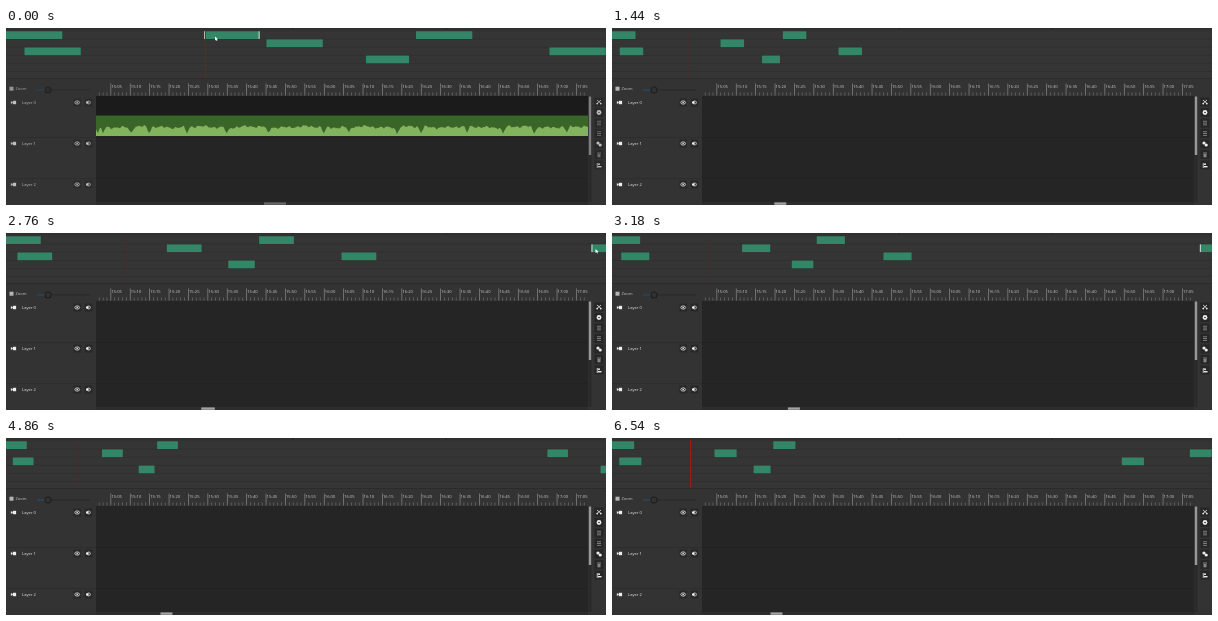
Write an HTML page with a canvas that moves like this. It is 600 px wide and 177 px high and loops after 7.2 s.

```html
<!DOCTYPE html>
<html lang="en">
<head>
<meta charset="utf-8">
<title>Timeline overview</title>
<style>
  html, body { margin: 0; width: 100%; height: 100%; overflow: hidden; background: #333; }
  canvas { display: block; width: 600px; height: 177px; }
</style>
</head>
<body>
<canvas id="stage"></canvas>
<script>
const canvas = document.getElementById('stage');
const ctx = canvas.getContext('2d');
const ratio = window.devicePixelRatio || 1;
canvas.width = 600 * ratio;
canvas.height = 177 * ratio;

const LOOP = 7200, STEP = 60, CLIP = 56.3;
const MAIN = { left: 90, top: 68, right: 582, bottom: 174 };
const ROW = 8.1;

// Clip starts on the overview, as [time, units]; one unit is one pixel at full scale.
const firstDrag = [[0, 198], [180, 232], [420, 365], [660, 490], [780, 518], [840, 518], [960, 590],
  [1680, 1950], [1860, 1950], [1980, 1400], [2100, 1052], [2160, 992], [2400, 850], [2580, 850],
  [3120, 1145], [3180, 1177], [3360, 1469]];
const secondDrag = [[4260, 543.5], [4380, 750], [4560, 1270], [4680, 1465], [4740, 1530],
  [5400, 1987], [5460, 2014], [5580, 2350], [5700, 1900], [5820, 1480], [5940, 1296]];
const fixedClips = [[0, CLIP, 0], [18.5, CLIP, 2], [260.5, CLIP, 1], [360, 43, 3], [410, CLIP, 0]];

const within = (t, a, b) => t >= a && t < b;
const mix = (a, b, k) => a + (b - a) * k;

function track(keys, t) {
  if (t <= keys[0][0]) return keys[0][1];
  for (let i = 1; i < keys.length; i++) {
    const [t0, v0] = keys[i - 1], [t1, v1] = keys[i];
    if (t <= t1) return mix(v0, v1, (t - t0) / (t1 - t0));
  }
  return keys[keys.length - 1][1];
}

function fitScale(t) {
  const end = Math.max(track(firstDrag, t), track(secondDrag, t)) + CLIP;
  return Math.min(1, 600 / end);
}

function box(x, y, w, h, color) {
  ctx.fillStyle = color;
  ctx.fillRect(x, y, w, h);
}

function dot(x, y, r, color) {
  ctx.fillStyle = color;
  ctx.beginPath();
  ctx.arc(x, y, r, 0, Math.PI * 2);
  ctx.fill();
}

function shape(points, color) {
  ctx.fillStyle = color;
  ctx.beginPath();
  points.forEach(([x, y]) => ctx.lineTo(x, y));
  ctx.fill();
}

function stroke(points, color, width = 0.8) {
  ctx.strokeStyle = color;
  ctx.lineWidth = width;
  ctx.beginPath();
  points.forEach(([x, y], i) => i ? ctx.lineTo(x, y) : ctx.moveTo(x, y));
  ctx.stroke();
}

// Small type is laid out large and scaled down to keep its true widths.
function label(text, x, y, size, color) {
  ctx.save();
  ctx.translate(x, y);
  ctx.scale(0.1, 0.1);
  ctx.font = `${size * 10}px "Noto Sans", sans-serif`;
  ctx.fillStyle = color;
  ctx.fillText(text, 0, 0);
  ctx.restore();
}

function overviewClip(x, w, row, selected) {
  const y = 3.3 + row * ROW;
  box(x, y, w, 7.7, '#338666');
  if (selected) {
    box(x, y, 1, 7.7, '#d0ddd6');
    box(x + w - 1, y, 1, 7.7, '#d0ddd6');
  }
}

function cursor(x, y) {
  if (x > 590) return;
  shape([[x, y], [x, y + 4], [x + 1, y + 3.2], [x + 1.7, y + 4.6],
    [x + 2.4, y + 4.2], [x + 1.8, y + 2.9], [x + 3, y + 2.8]], '#fff');
}

function playheadColor(t) {
  if (t < STEP) return '#6e2525';
  return within(t, 1740, 2700) || t >= 5700 ? '#a8171b' : '#482c2c';
}

function overview(t) {
  const scale = fitScale(Math.max(0, t - STEP));
  const first = { x: track(firstDrag, t) * scale, row: t < 1200 ? 0 : 1 };
  const second = { x: track(secondDrag, t) * scale, row: within(t, 4560, 5760) ? 3 : 2 };

  box(0, 0, 600, 50, '#353535');
  box(0, 0, 600, 2, '#303030');
  for (let i = 0; i < 6; i++) box(0, 2.6 + i * ROW, 600, 0.6, '#2d2d2d');
  box(286.5, 0, 1, 2, '#222');
  box(439.5, 0, 1, 2, '#222');
  box(0, 50, 600, 1, '#2b2b2b');

  fixedClips.forEach(([x, width, row]) => overviewClip(x * scale, width * scale, row));
  overviewClip(second.x, CLIP * scale, second.row, within(t, 4260, 4740) || within(t, 5520, 6540));
  overviewClip(first.x, 55.6 * scale, first.row, t < 3420 || within(t, 3960, 4080));

  box(199 * fitScale(t) - 0.2, 2, 1, 47.5, playheadColor(t));

  if (t < 3420) cursor(first.x + (t < 900 ? 11 : 4), (t < 900 ? 8.5 : 16));
  else if (within(t, 3960, 4260)) {
    const k = (t - 3960) / 300;
    cursor(mix(577, 219, k), mix(18.5, 22, k));
  } else if (within(t, 4260, 6180)) cursor(second.x + 6, 22 + (second.row - 2) * ROW);
  else if (within(t, 6180, 6300)) cursor(mix(530, 560, (t - 6180) / 60), 24);

  return scale;
}

function ruler() {
  box(0, 51, 600, 17, '#333');
  for (let s = -3; s <= 122; s++) {
    const x = 104.5 + s * 3.88, major = s % 5 === 0;
    if (x > MAIN.right) break;
    box(x, major ? 55.5 : 64.5, 0.7, major ? 12 : 3, major ? '#8a8a8a' : '#707070');
    if (major && s >= 0) {
      const time = 15 * 60 + 5 + s;
      const text = `${Math.floor(time / 60)}:${String(time % 60).padStart(2, '0')}`;
      label(text, x + 0.9, 59.6, 4.1, '#c4c4c4');
    }
  }
}

const notches = [92, 97, 125, 143, 181, 221, 262, 318, 343, 391, 415, 461, 497, 528, 561];

function waveTop(x) {
  const swell = Math.sin(x * 0.31) + Math.sin(x * 0.117 + 1);
  const jitter = Math.sin(x * 0.83 + 2) + Math.sin(x * 1.9) * Math.sin(x * 0.47);
  const dip = notches.reduce((d, n) => Math.max(d, 6 - Math.abs(x - n) * 1.8), 0);
  return Math.min(106.5, 99 + swell * 0.6 + jitter * 0.7 + dip);
}

function mainArea(start) {
  const { left, top, right, bottom } = MAIN;
  box(left, top, right - left, bottom - top, '#252525');
  box(left, 109, right - left, 0.7, '#202020');
  box(left, 150, right - left, 0.7, '#202020');

  const shift = (start - 198) * 18.2, from = left - 37 + shift;
  if (from >= right) return;
  ctx.save();
  ctx.beginPath();
  ctx.rect(left, top, right - left, bottom - top);
  ctx.clip();
  box(from, top, 1020, 20, '#1b1b1b');
  box(from, 87.5, 1020, 20.5, '#3a6529');
  const points = [[from, 108]];
  for (let x = from; x <= right; x++) points.push([x, waveTop(x - shift)]);
  points.push([right, 108]);
  shape(points, '#82b45d');
  ctx.restore();
}

function layerRow(index) {
  const y = 74.5 + index * 41;
  label(`Layer ${index}`, 16, y + 1.3, 4.1, '#ddd');
  box(6.8, y - 1.7, 3.3, 3.4, '#eee');
  shape([[4.9, y - 1.5], [7, y], [4.9, y + 1.5]], '#eee');
  box(67.5, y - 4, 7.5, 8, '#282828');
  box(78.8, y - 4, 7.5, 8, '#282828');

  ctx.strokeStyle = '#e8e8e8';
  ctx.lineWidth = 0.8;
  ctx.beginPath();
  ctx.ellipse(71.2, y, 2.4, 1.6, 0, 0, Math.PI * 2);
  ctx.stroke();
  dot(71.2, y, 0.8, '#eee');

  shape([[80, y - 0.9], [81, y - 0.9], [82.6, y - 2.2], [82.6, y + 2.2], [81, y + 0.9], [80, y + 0.9]], '#eee');
  stroke([[83.6, y - 1.7], [84.3, y], [83.6, y + 1.7]], '#eee');
}

function tools() {
  const x = 593, light = '#eee', dim = '#858585';
  for (let i = 0; i < 7; i++) box(588.5, 69.5 + i * 10.5, 9, 9, '#262626');
  stroke([[591, 72], [595, 75.5]], light);
  stroke([[595, 72], [591, 75.5]], light);
  dot(591.2, 75.6, 0.9, light);
  dot(594.8, 75.6, 0.9, light);
  dot(x, 84.5, 2.4, light);
  dot(x, 84.5, 0.8, '#262626');
  for (const y of [95, 105.5]) {
    for (let i = -1; i <= 1; i++) box(x - 2, y + i * 1.8 - 0.4, 4, 0.9, dim);
  }
  dot(592, 115, 1.6, light);
  dot(594.2, 117, 1.6, light);
  box(x - 2, 124.5, 4, 1, dim);
  box(x - 1.5, 126, 3, 3.3, dim);
  box(x - 2.2, 135, 0.8, 5, light);
  box(x - 1, 135.5, 2, 1.4, light);
  box(x - 1, 138, 3.5, 1.4, light);
}

function slider() {
  box(31, 61.5, 53, 0.9, '#272727');
  box(31, 61.5, 9, 0.9, '#23577f');
  dot(42, 62, 3.5, '#1f1f1f');
  dot(42, 62, 2.4, '#323232');
}

function controls() {
  box(582.8, 68.5, 2.4, 58.5, '#999');
  box(3.5, 58.7, 4, 4, '#b5b5b5');
  label('Zoom', 9.5, 62.3, 4.1, '#bbb');
  slider();
  for (let i = 0; i < 3; i++) layerRow(i);
  tools();
}

function panels() {
  box(0, 68, 90, 106, '#333');
  box(582, 68, 18, 106, '#333');
  box(0, 109, 90, 0.7, '#2b2b2b');
  box(0, 150, 90, 0.7, '#2b2b2b');
  box(582.5, 68, 3, 106, '#2a2a2a');
  box(0, 174, 600, 3, '#333');
  box(90, 174.3, 492, 2.7, '#2c2c2c');
}

function scrollThumb(scale) {
  box(94 + 164 * scale, 174.4, Math.max(12, 22 * scale), 2.4, '#a2a2a2');
}

function draw(now) {
  const t = Math.floor((now % LOOP) / STEP) * STEP;
  ctx.setTransform(ratio, 0, 0, ratio, 0, 0);
  box(0, 0, 600, 177, '#333');
  const scale = overview(t);
  ruler();
  mainArea(track(firstDrag, t));
  panels();

  // The widgets start out dimmed.
  ctx.globalAlpha = t < STEP ? 0.75 : 1;
  controls();
  ctx.globalAlpha = t < STEP ? 0.5 : 1;
  scrollThumb(scale);
  ctx.globalAlpha = 1;
}

const began = performance.now();
function tick() {
  draw(performance.now() - began);
  requestAnimationFrame(tick);
}
tick();
</script>
</body>
</html>
```
